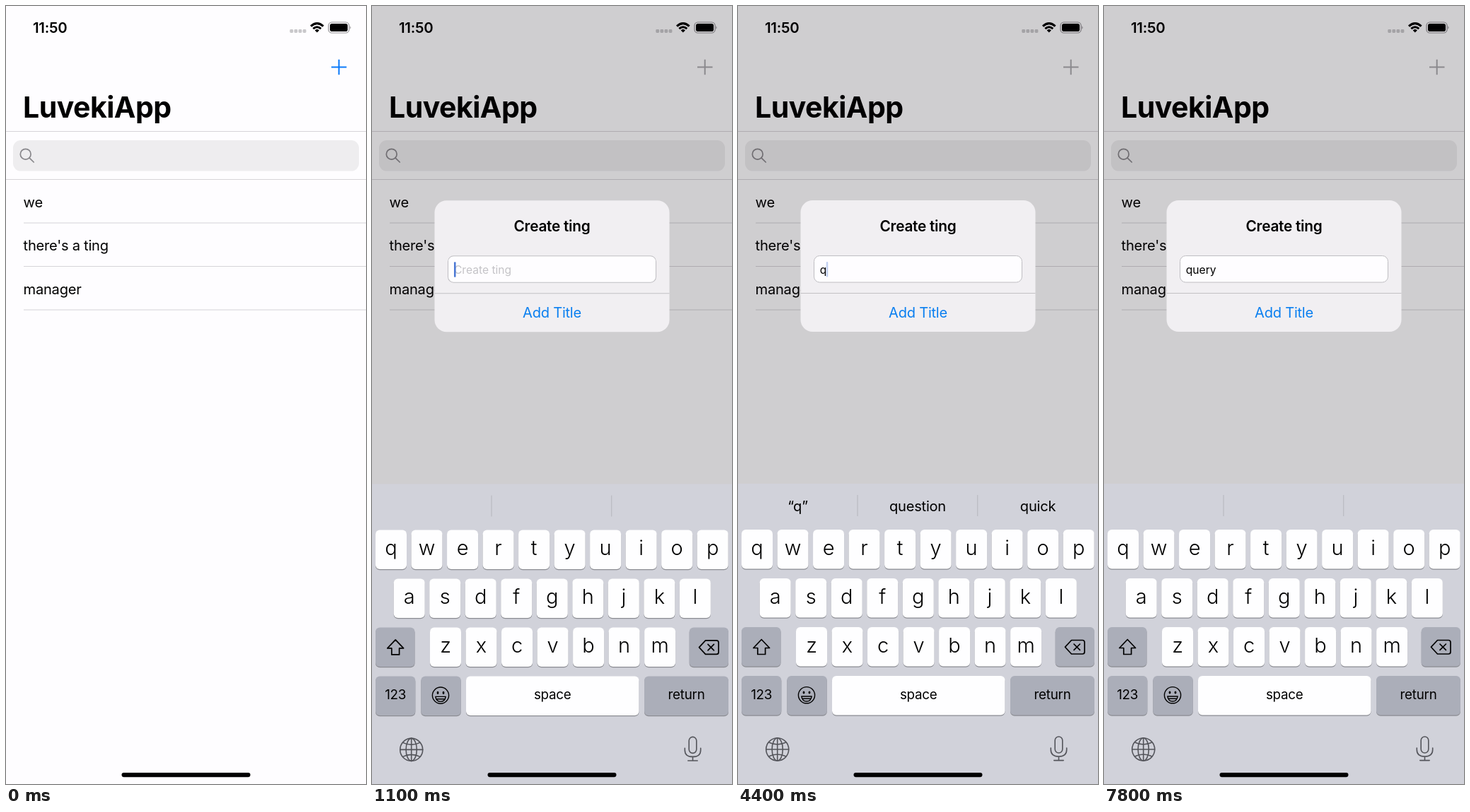
Write an HTML page that moves like this. It is 509 px wide and 1101 px high and loops after 8 s.

```html
<!DOCTYPE html>
<html lang="en">
<head>
<meta charset="utf-8">
<title>Create ting</title>
<style>
  html, body { margin: 0; width: 100%; height: 100%; overflow: hidden; background: #fefdff; }
  svg { display: block; width: 509px; height: 1101px; }
  text { font-family: Inter, Roboto, sans-serif; letter-spacing: -0.0125em; white-space: pre; }
  .mid { text-anchor: middle; }
  .body { font-size: 20.1px; }
  .key { font-size: 29px; font-weight: 300; letter-spacing: 0; }
  .fn { font-size: 18.8px; }
  .input { font-size: 15.6px; letter-spacing: 0; }
  .line { fill: none; stroke-linecap: round; stroke-linejoin: round; }
</style>
</head>
<body>
<svg viewBox="0 0 509 1101" xmlns="http://www.w3.org/2000/svg">
  <rect width="509" height="1101" fill="#fefdff"/>

  <!-- status bar -->
  <text x="38" y="38" font-size="20.4" font-weight="600">11:50</text>
  <g id="dots" fill="#c9c8cb"></g>
  <g fill="none" stroke="#000" stroke-width="3">
    <path d="M431 28.6Q439.8 20.6 448.6 28.6"/>
    <path d="M434.3 32.2Q439.8 27.4 445.3 32.2"/>
  </g>
  <path d="M436.7 34.4Q439.8 31.8 442.9 34.4L439.8 37.6Z"/>
  <rect x="456" y="23" width="29" height="15" rx="4.6" fill="none" stroke="#8f8e91" stroke-width="1.2"/>
  <rect x="458" y="25" width="25" height="11" rx="2.8"/>
  <path d="M486.4 28.2Q488.6 30.5 486.4 32.8Z" fill="#8f8e91"/>

  <!-- list page -->
  <path id="plus" d="M460 86.5H481.5M470.7 75.8V97.2" stroke-width="2" fill="none"/>
  <text x="24" y="157.5" font-size="41" font-weight="700">LuvekiApp</text>
  <rect x="10" y="190" width="489" height="43.6" rx="11" fill="#eeedef"/>
  <g class="line" stroke="#88878b" stroke-width="1.7">
    <circle cx="27.7" cy="209.7" r="7.4"/>
    <path d="M33.2 215.2L39.2 221"/>
  </g>
  <path d="M0 177.5H509M0 245.5H509M25 307H509M25 368.5H509M25 430H509" stroke="#d6d4d8" stroke-width="1.1"/>
  <g class="body" id="list"></g>

  <rect id="dim" width="509" height="1101" fill="#080006"/>

  <!-- dialog -->
  <g id="alert">
    <rect x="88.5" y="275" width="332" height="186" rx="17" fill="#f1eff2"/>
    <text class="mid" x="254.5" y="319" font-size="20.8" font-weight="600">Create ting</text>
    <rect id="field" x="107.5" y="353.5" width="294" height="37.5" rx="8" fill="#fefdff" stroke="#bfbec2"/>
    <text class="input" id="hint" x="116" y="378.5" fill="#c4c3c7">Create ting</text>
    <text class="input" id="typed" x="115.8" y="378.5"></text>
    <rect id="caret" y="362" width="2.5" height="21.5" rx="1" fill="#4a77d4"/>
    <path d="M88.5 406.5H420.5" stroke="#c2c1c4"/>
    <text class="mid body" x="254.5" y="441" fill="#0a7ff0">Add Title</text>
  </g>

  <!-- keyboard -->
  <g id="board">
    <rect y="676" width="509" height="426" fill="#d1d2da"/>
    <path d="M169 692V722M338.7 692V722" stroke="#b8b9c0" stroke-width="1.1"/>
    <g class="mid body" id="words"></g>
    <g id="keys"></g>
    <g class="line" stroke="#000" stroke-width="1.7">
      <path d="M33.2 896.5L44.6 908.5H38.6V917.5H27.8V908.5H21.8Z"/>
      <path d="M471.5 897.5H487Q490 897.5 490 900.5V914Q490 917 487 917H471.5L462.5 907.2Z"/>
      <path d="M475 903L483.4 911.4M483.4 903L475 911.4"/>
      <g stroke-width="1.4">
        <circle cx="97" cy="975.2" r="11.6"/>
        <path d="M89.8 977H104.2Q103.2 984 97 984Q90.8 984 89.8 977ZM91.2 980.3H102.8"/>
      </g>
    </g>
    <ellipse cx="93" cy="971.5" rx="1.4" ry="2.1"/>
    <ellipse cx="101" cy="971.5" rx="1.4" ry="2.1"/>
    <g class="line" stroke="#54555b" stroke-width="1.6">
      <circle cx="55.7" cy="1052" r="16"/>
      <ellipse cx="55.7" cy="1052" rx="7.6" ry="16"/>
      <path d="M55.7 1036V1068M39.7 1052H71.7M43.5 1042Q55.7 1048 67.9 1042M43.5 1062Q55.7 1056 67.9 1062"/>
      <rect x="448.2" y="1034" width="10.6" height="23" rx="5.3"/>
      <path d="M442.3 1050V1052.5Q442.3 1062 453.5 1062Q464.7 1062 464.7 1052.5V1050M453.5 1062V1067.6M446.8 1067.6H460.2"/>
    </g>
  </g>

  <rect x="163.5" y="1085" width="182" height="6.2" rx="3.1"/>
</svg>

<script>
const $ = id => document.getElementById(id);
const LOOP = 8000, STEP = 100, OPEN = 677;

// time, field text, left / middle / right suggestion
const ENTRIES = [
  [700, "", "", "", ""],
  [3800, "q", "“q”", "question", "quick"],
  [4500, "qe", "“qe”", "we", "were"],
  [5200, "qer", "“qer”", "wee", "were"],
  [5900, "qert", "“qert”", "query", "wetter"],
  [7100, "query ", "", "", ""]
];
const SLOTS = [84.5, 254, 424];

function key(x, y, w, label, cls, fill = "#fefeff") {
  const box = (dy, color) =>
    `<rect x="${x}" y="${y + dy}" width="${w}" height="55.5" rx="6" fill="${color}"/>`;
  const base = y + (cls === "key" ? 35.6 : 33);
  return box(1.3, "#8b8c92") + box(0, fill) +
    `<text class="mid ${cls}" x="${x + w / 2}" y="${base}">${label}</text>`;
}

function build() {
  const grey = "#abaeb9";
  let out = "";
  [["qwertyuiop", 5, 741], ["asdfghjkl", 30.7, 810], ["zxcvbnm", 82, 879]].forEach(([row, x, y]) =>
    [...row].forEach((c, i) => out += key(x + i * 50.52, y, 44, c, "key")));
  out += key(5, 879, 55.5, "", "fn", grey) + key(448.7, 879, 55.3, "", "fn", grey);
  out += key(5, 948, 56.3, "123", "fn", grey) + key(69.3, 948, 56.5, "", "fn", grey);
  out += key(133, 948, 244.5, "space", "fn") + key(385, 948, 119, "return", "fn", grey);
  $("keys").innerHTML = out;

  $("list").innerHTML = ["we", "there's a ting", "manager"]
    .map((s, i) => `<text x="24.6" y="${284.5 + i * 61.5}">${s}</text>`).join("");
  $("dots").innerHTML = [0, 1, 2, 3]
    .map(i => `<rect x="${401.3 + i * 6.1}" y="33" width="4.8" height="5" rx="1.4"/>`).join("");
}

// critically damped spring
function spring(ms) {
  const a = Math.max(0, ms) * 0.022;
  return 1 - (1 + a) * Math.exp(-a);
}

const clamp = v => Math.min(1, Math.max(0, v));
const mix = (a, b, p) => `rgb(${a.map((v, i) => Math.round(v + (b[i] - v) * p))})`;

function blink(age) {
  if (age < 500) return 1;
  return [1, 1, 1, 1, 1, 0.66, 0.33, 0, 0, 0.5][Math.floor(age % 1000 / STEP)];
}

// letters appear under a soft edge that sweeps to the right
function word(text, x, edge, alpha) {
  const n = text.length;
  const letters = [...text].map((c, i) =>
    `<tspan fill-opacity="${(alpha * clamp(edge - i / n)).toFixed(2)}">${c}</tspan>`).join("");
  return `<text x="${x}" y="714.5">${letters}</text>`;
}

function suggestions(t) {
  // the bar follows the field by one step
  let n = 0;
  ENTRIES.forEach((e, i) => { if (t >= e[0] + STEP) n = i; });
  const age = t - ENTRIES[n][0] - STEP;
  const closing = n === ENTRIES.length - 1;
  const now = ENTRIES[closing ? n - 1 : n];
  const before = ENTRIES[Math.max(0, n - 1)];
  const alpha = closing ? clamp(0.6 - age / 300) : 1;
  return SLOTS.map((x, i) => {
    const s = now[i + 2];
    const steady = i === 0 || s === before[i + 2];
    return word(s, x, steady ? 2 : 0.9 + age / 133, alpha);
  }).join("");
}

function draw(time) {
  const t = Math.floor(time % LOOP / STEP) * STEP;
  const p = spring(t - OPEN);

  $("plus").setAttribute("stroke", mix([10, 122, 250], [169, 168, 172], p));
  $("plus").setAttribute("opacity", t === 500 || t === 600 ? 0.4 : 1);
  $("dim").setAttribute("opacity", 0.19 * p);
  $("board").setAttribute("transform", `translate(0 ${425 * (1 - p)})`);

  const scale = 1 + 0.2 * (1 - p), cy = 368 + 191 * (1 - p);
  $("alert").setAttribute("opacity", p);
  $("field").setAttribute("fill-opacity", clamp(4 * p - 3));
  $("alert").setAttribute("transform",
    `translate(254.5 ${cy}) scale(${scale}) translate(-254.5 -368)`);

  const entry = ENTRIES.filter(e => t >= e[0]).pop() || ENTRIES[0];
  const typed = $("typed");
  typed.textContent = entry[1];
  $("hint").setAttribute("opacity", entry[1] ? 0 : 1);
  $("caret").setAttribute("x", 116 + (entry[1] ? typed.getComputedTextLength() - 0.8 : 0));
  $("caret").setAttribute("opacity", blink(t - entry[0]));
  $("words").innerHTML = suggestions(t);
}

build();
const start = performance.now();
function tick() {
  draw(performance.now() - start);
  requestAnimationFrame(tick);
}
tick();
</script>
</body>
</html>
```
